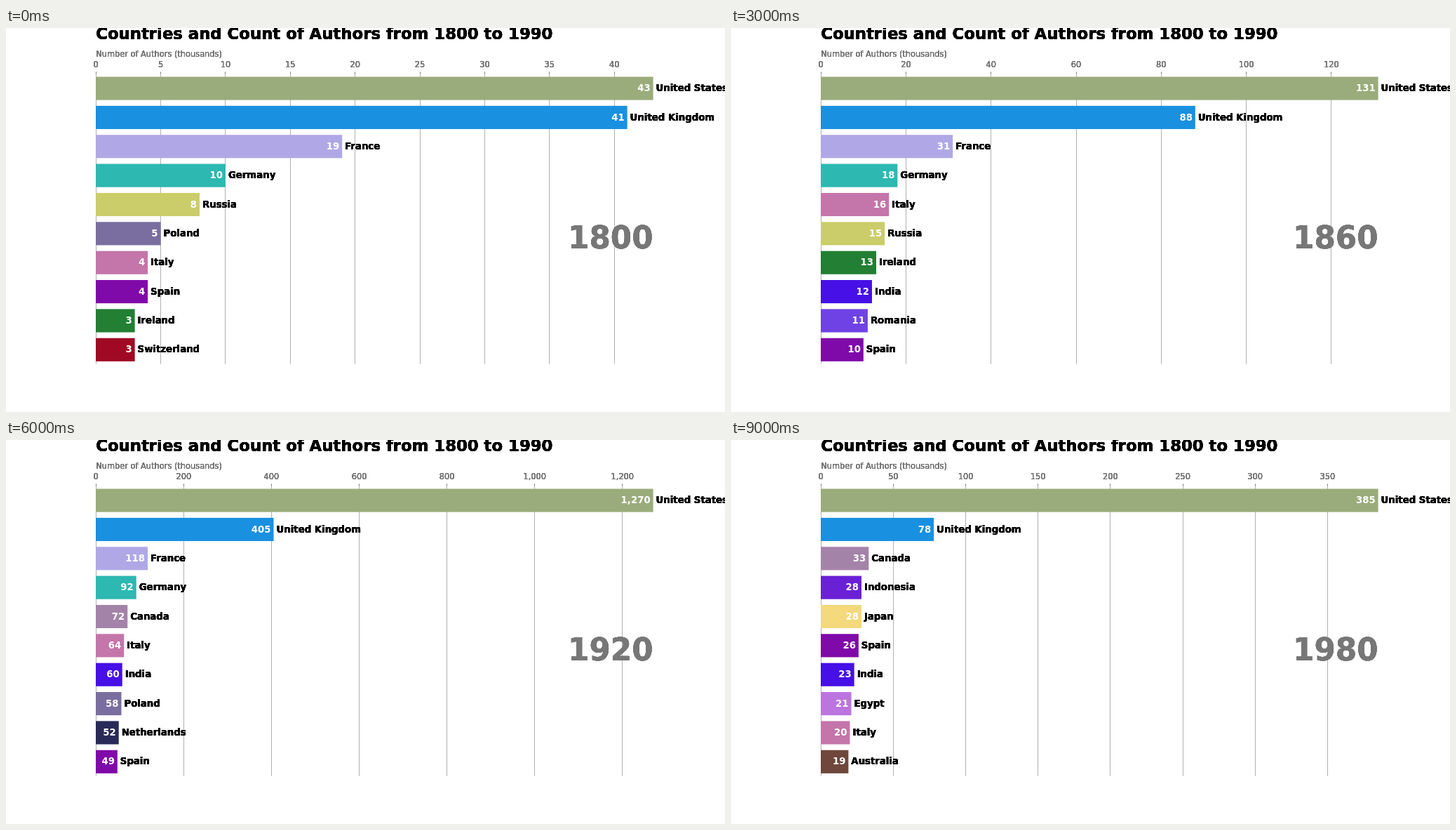
These frames come from a looping animation (1025x547 px, 10 s). An HTML page with a canvas:

```html
<!DOCTYPE html>
<html lang="en">
<head>
<meta charset="utf-8">
<title>Countries and Count of Authors</title>
<style>
html, body { margin: 0; width: 100%; height: 100%; overflow: hidden; background: #fff; }
canvas { display: block; }
</style>
</head>
<body>
<canvas id="stage" width="1025" height="547"></canvas>
<script>
const ctx = document.getElementById('stage').getContext('2d');

const countries = {
  US: ['United States', '#9aac7b'], UK: ['United Kingdom', '#1a90e0'],
  FR: ['France', '#b0a8e6'], DE: ['Germany', '#2db8b1'],
  RU: ['Russia', '#cbcd6a'], PL: ['Poland', '#7a6ea0'],
  IT: ['Italy', '#c475a9'], ES: ['Spain', '#8009a9'],
  IE: ['Ireland', '#227f33'], CH: ['Switzerland', '#9f0924'],
  BR: ['Brazil', '#5a639f'], IN: ['India', '#4610e6'],
  NL: ['Netherlands', '#2a2a58'], RO: ['Romania', '#6f42e5'],
  EG: ['Egypt', '#bc75df'], CA: ['Canada', '#a483a9'],
  AU: ['Australia', '#70473c'], JP: ['Japan', '#f4d97d'],
  ID: ['Indonesia', '#6a21d6']
};

// One ranking per step of twenty years, from 1800 on.
const rankings = [
  'US 43 UK 41 FR 19 DE 10 RU 8 PL 5 IT 4 ES 4 IE 3 CH 3',
  'UK 55 US 54 FR 15 DE 8 RU 7 BR 6 IT 4 IN 4 NL 3 ES 3',
  'US 75 UK 55 FR 23 DE 10 IT 9 IE 9 RU 8 PL 6 RO 5 IN 5',
  'US 131 UK 88 FR 31 DE 18 IT 16 RU 15 IE 13 IN 12 RO 11 ES 10',
  'US 263 UK 132 FR 41 RU 35 DE 35 IT 27 IN 24 RO 23 ES 21 EG 21',
  'US 740 UK 262 FR 91 DE 55 IN 45 EG 42 PL 41 RU 41 IT 36 CA 33',
  'US 1270 UK 405 FR 118 DE 92 CA 72 IT 64 IN 60 PL 58 NL 52 ES 49',
  'US 2200 UK 593 FR 143 CA 135 DE 130 IT 96 NL 88 AU 76 ES 75 JP 74',
  'US 1547 UK 391 CA 104 FR 97 DE 88 JP 71 IT 68 ES 64 IN 58 AU 57',
  'US 385 UK 78 CA 33 ID 28 JP 28 ES 26 IN 23 EG 21 IT 20 AU 19'
].map(row => row.match(/\w+ \d+/g).map(pair => {
  const [code, value] = pair.split(' ');
  return [...countries[code], +value];
}));

const plot = { x: 128.2, y: 65.4, width: 794.4, height: 413.2 };
const bar = { y: 69.5, pitch: 41.36, height: 33.1, gap: 3.97 };
const grey = '#777';
const format = n => n.toLocaleString('en-US');

// Repeated passes harden the edges of the letters.
function text(str, x, y, size, color, { align = 'left', weight = 'bold', passes = 6 } = {}) {
  ctx.font = `${weight} ${size}px "DejaVu Sans", sans-serif`;
  ctx.textAlign = align;
  ctx.fillStyle = color;
  while (passes--) ctx.fillText(str, x, y);
}

function rect(x, y, w, h, color) {
  ctx.fillStyle = color;
  ctx.fillRect(x, y, w, h);
}

// Smallest round step that gives at most nine intervals.
function tickStep(max) {
  const raw = max / 9, power = 10 ** Math.floor(Math.log10(raw));
  return power * [1, 2, 2.5, 5, 10].find(n => n * power >= raw);
}

function draw(step) {
  const rows = rankings[step], max = rows[0][2];
  const xOf = value => plot.x + plot.width * value / max;
  rect(0, 0, 1025, 547, '#fff');

  const unit = tickStep(max);
  for (let v = 0; v <= max; v += unit) {
    const x = Math.floor(xOf(v));
    rect(x, plot.y, 1, plot.height, '#b0b0b0');
    rect(x, plot.y - 3, 1, 3, grey);
    text(format(v), xOf(v), 56, 11.39, grey, { align: 'center', weight: 'normal' });
  }

  rows.forEach(([name, color, value], i) => {
    const y = bar.y + bar.pitch * i, end = xOf(value), base = y + bar.height / 2 + 4.2;
    rect(128, y, end - 128, bar.height, color);
    text(format(value), end - bar.gap, base, 13.29, '#fff', { align: 'right', passes: 1 });
    text(name, end + bar.gap, base, 13.29, '#000');
  });

  text('Countries and Count of Authors from 1800 to 1990', plot.x, 16, 22.78, '#000');
  text('Number of Authors (thousands)', plot.x, 40.6, 11.39, grey, { weight: 'normal' });
  text(1800 + 20 * step, plot.x + plot.width, 314, 43.66, grey, { align: 'right' });
}

const start = performance.now();
let shown = -1;
function tick() {
  const step = Math.floor((performance.now() - start) / 1000) % rankings.length;
  if (step !== shown) draw(shown = step);
  requestAnimationFrame(tick);
}
tick();
</script>
</body>
</html>
```
